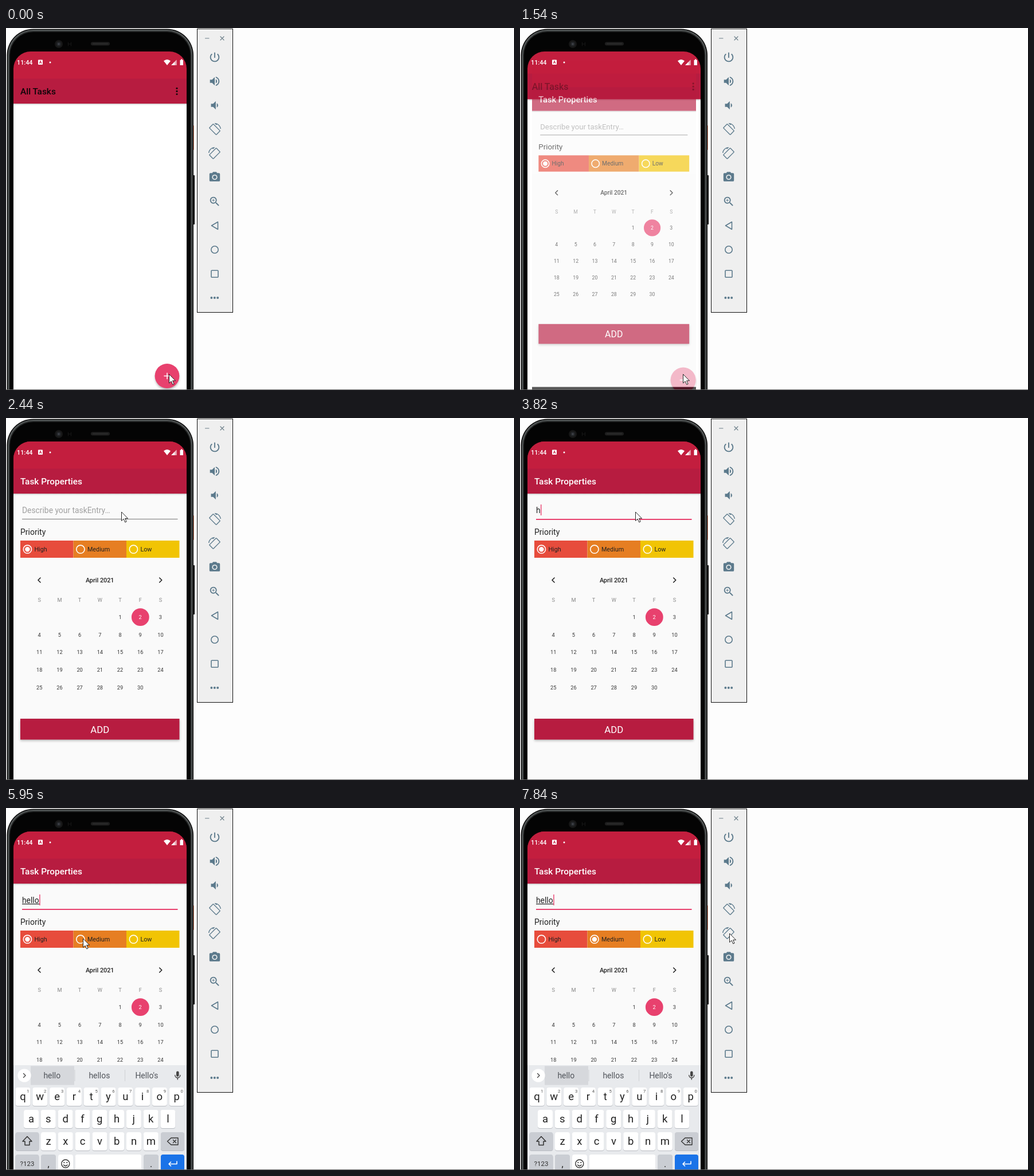
Write an HTML page that moves like this. It is 886 by 632 pixels and loops after 7990 ms.

```html
<!DOCTYPE html>
<html lang="en">
<head>
<meta charset="utf-8">
<title>Task app demo</title>
<style>
  html, body { margin: 0; width: 100%; height: 100%; overflow: hidden; background: #fdfdfd; }
  svg { display: block; width: 886px; height: 632px; font-family: Roboto, "Noto Sans", sans-serif; }
  .mid { text-anchor: middle; }
  .line { fill: none; stroke-linecap: round; stroke-linejoin: round; }
</style>
</head>
<body>
<svg id="stage" viewBox="0 0 886 632"></svg>
<script>
const PINK = '#e8416e', CRIMSON = '#b71c40', STATUS = '#c31e3e', SLATE = '#5c7a8c';
const LOOP = 7990;

const text = (x, y, size, s, fill = '#222', extra = '') =>
  `<text x="${x}" y="${y}" font-size="${size}" fill="${fill}" ${extra}>${s}</text>`;
const mid = (x, y, size, s, fill, extra = '') => text(x, y, size, s, fill, `class="mid" ${extra}`);
const rect = (x, y, w, h, fill, r = 0, extra = '') =>
  `<rect x="${x}" y="${y}" width="${w}" height="${h}" rx="${r}" fill="${fill}" ${extra}/>`;
const circle = (x, y, r, fill, extra = '') => `<circle cx="${x}" cy="${y}" r="${r}" fill="${fill}" ${extra}/>`;
const path = (d, fill, extra = '') => `<path d="${d}" fill="${fill}" ${extra}/>`;
const line = (d, color, w = 1.5) => `<path class="line" d="${d}" stroke="${color}" stroke-width="${w}"/>`;
const each = (list, fn) => [...list].map(fn).join('');

const defs = `<defs>
  <linearGradient id="drop" x1="0" x2="0" y1="0" y2="1">
    <stop offset="0" stop-opacity=".2"/><stop offset="1" stop-opacity="0"/>
  </linearGradient>
  <filter id="blur" x="-30%" y="-30%" width="160%" height="160%"><feGaussianBlur stdDeviation="2.2"/></filter>
  <clipPath id="screen">${rect(13, 41, 302, 700, '#000', 30)}</clipPath>
</defs>`;

// The phone body is a stack of rounded outlines, from the rim inwards.
function phone() {
  const shell = (inset, r, fill) => rect(1.5 + inset, 1.5 + inset, 325.5 - 2 * inset, 760, fill, r);
  return rect(325, 170, 3, 43, '#e08a70', 1) + rect(325, 257, 4.2, 86, '#1c1c1c', 1)
    + shell(0, 46, '#080808') + shell(1.6, 44.4, '#565a5a') + shell(3.6, 42.4, '#2a2c2c') + shell(5.4, 40.6, '#040404')
    + circle(92, 28, 7, '#171717') + circle(92, 28, 4, '#232528') + circle(92, 28, 1.8, '#40444a')
    + line('M108.5 25V31M113.5 25V31M108.5 28H113.5', '#161616', 1.2)
    + rect(148, 24.5, 33, 6, '#1e1e1e', 3) + rect(151, 26.5, 27, 2, '#2b2b2b', 1);
}

function statusBar() {
  return text(19, 64, 10.8, '11:44', '#fff', 'font-weight="500"')
    + rect(56, 55.5, 8, 8.5, '#fff', 1) + mid(60, 62.3, 7, 'A', STATUS, 'font-weight="700"')
    + circle(77, 60, 1.5, '#fff')
    + path('M275 57.5Q281 52.5 287 57.5L281 65Z', '#fff')
    + path('M288 65H297.5V55.5Z', '#fff') + path('M294 58.5L297.5 55V65H294Z', STATUS, 'opacity=".35"')
    + path('M303.5 56H305V54.5H307.5V56H309V65H303.5Z', '#fff');
}

const appBar = body => rect(13, 100, 302, 602, body) + rect(13, 132, 302, 3, 'url(#drop)')
  + rect(13, 41, 302, 60, STATUS) + rect(13, 88.5, 302, 43.5, CRIMSON) + rect(13, 641, 302, 61, '#000');

function listPage() {
  return appBar('#fff') + text(25, 116.3, 15.4, 'All Tasks', '#0d0508', 'font-weight="500"')
    + each([105.3, 110.4, 115.5], y => circle(298, y, 1.6, '#1a060b'))
    + circle(281, 610.5, 20.5, '#000', 'id="shade" opacity=".35" filter="url(#blur)"')
    + circle(281, 607.5, 21.4, PINK) + circle(281, 607.5, 21.4, '#fff', 'id="ripple"')
    + line('M276 607.5H286M281 602.5V612.5', '#fff', 1.5);
}

function radio(x, label, color, id) {
  return rect(x, 214, 92.5, 30, color)
    + circle(x + 12.4, 229.2, 7.1, 'none', 'stroke="#fff" stroke-width="1.6"')
    + circle(x + 12.4, 229.2, 4.2, '#fff', `id="${id}"`)
    + text(x + 24.4, 233.2, 10.8, label);
}

function calendar() {
  const col = i => 58.2 + 35.2 * i;
  let out = line('M60 279L56 283L60 287M267.7 279L271.7 283L267.7 287', '#222', 1.6)
    + mid(163.7, 286.8, 10.8, 'April 2021', '#222', 'font-weight="500"')
    + each('SMTWTFS', (d, i) => mid(col(i), 321.2, 9.2, d, '#888'))
    + circle(234.3, 347.7, 15.4, PINK);
  for (let d = 1; d <= 30; d++) {
    const cell = d + 3;
    out += mid(col(cell % 7), 351 + 30.7 * Math.floor(cell / 7), 9.2, d, d === 2 ? '#fff' : '#333');
  }
  return out;
}

function taskPage() {
  return appBar('#fafafa') + text(25, 116.3, 15.4, 'Task Properties', '#fff', 'font-weight="500"')
    + text(28, 166.3, 13.85, 'Describe your taskEntry…', '#a0a0a0', 'id="hint"')
    + text(28, 166.3, 13.85, '', '#222', 'id="entry"')
    + rect(28, 167, 30.5, 1.2, '#222', 0, 'id="under"')
    + rect(28, 176, 271.5, 1, '#777', 0, 'id="rule"')
    + rect(0, 151, 1.4, 19, PINK, 0, 'id="caret"')
    + text(25, 203.6, 14, 'Priority')
    + radio(25, 'High', '#e74c3c', 'high') + radio(117.5, 'Medium', '#e67e22', 'medium')
    + radio(210, 'Low', '#f1c404', 'low')
    + calendar()
    + rect(25, 527, 277.5, 36.5, '#000', 1, 'opacity=".25" filter="url(#blur)"')
    + rect(25, 525, 277.5, 36.5, CRIMSON) + mid(163.7, 549.8, 16.8, 'ADD', '#fff');
}

function key(x, y, w, fill = '#fff') {
  return rect(x, y + 1, w, 32, '#b9bcc2', 4) + rect(x, y, w, 32, fill, 4);
}

function keyboard() {
  const GREY = '#cacdd3', INK = '#222';
  const row = (letters, x0, y) => each(letters, (c, i) => {
    const x = x0 + 29.8 * i;
    return key(x - 13, y, 26) + mid(x, y + 21.8, 18.5, c, INK);
  });
  const words = ['hello', 'hellos', "Hello's"];
  return rect(13, 449, 302, 183, '#e8eaed')
    + rect(43, 450.5, 76, 33, '#d6d8dc', 0, 'id="pick"')
    + circle(32, 467, 11.6, '#fff') + line('M30.5 463.5L34 467L30.5 470.5', '#444', 1.4)
    + `<g id="words">` + rect(119.5, 457, 1, 20, '#cfd1d5') + rect(207, 457, 1, 20, '#cfd1d5')
    + each(words, (w, i) => mid(80.3 + 82.6 * i, 472, 13.9, w, '#50545a')) + '</g>'
    + rect(297, 459.5, 4.6, 9.5, '#444', 2.3) + line('M294.8 466.5A4.5 4.5 0 0 0 303.8 466.5M299.3 471V474', '#444', 1.4)
    + row('qwertyuiop', 29.5, 488)
    + each('1234567890', (c, i) => mid(38.5 + 29.8 * i, 497, 7.8, c, '#555'))
    + row('asdfghjkl', 44, 527)
    + key(16.5, 566, 41, GREY) + row('zxcvbnm', 74, 566) + key(270, 566, 41, GREY)
    + line('M37 573.5L45 582H41V588.5H33V582H29Z', '#333', 1.5)
    + line('M288 576H300V588H288L281.5 582ZM291.5 579.5L296.5 584.5M296.5 579.5L291.5 584.5', '#333', 1.4)
    + key(16.5, 605, 41, GREY) + mid(37, 625, 11.5, '?123', '#333')
    + key(61, 605, 26, GREY) + mid(74, 627, 16, ',', INK)
    + key(91, 605, 26) + circle(103.8, 621, 7, 'none', 'stroke="#333" stroke-width="1.4"')
    + circle(101.3, 619, 1.1, '#333') + circle(106.3, 619, 1.1, '#333') + line('M100.5 623Q103.8 627 107.1 623', '#333', 1.3)
    + key(120.5, 605, 116) + key(240, 605, 26, GREY) + mid(253, 627, 16, '.', INK)
    + key(270, 605, 41, '#1a73e8') + line('M298 617V621.5H284M287.5 618L284 621.5L287.5 625', '#fff', 1.6);
}

function toolPanel() {
  const icon = (y, body, flip = 1) =>
    `<g transform="translate(364 ${y}) scale(${.92 * flip} .92) translate(-12 -12)" fill="${SLATE}">${body}</g>`;
  const glyph = d => `<path d="${d}"/>`;
  const turn = glyph('M16.48 2.52c3.27 1.55 5.61 4.72 5.97 8.48h1.5C23.44 4.84 18.29 0 12 0l-.66.03 3.81 3.81 1.33-1.32z'
    + 'm-6.25-.77c-.59-.59-1.54-.59-2.12 0L1.75 8.11c-.59.59-.59 1.54 0 2.12l12.02 12.02c.59.59 1.54.59 2.12 0l6.36-6.36'
    + 'c.59-.59.59-1.54 0-2.12L10.23 1.75zm4.6 19.44L2.81 9.17l6.36-6.36 12.02 12.02-6.36 6.36z');
  return rect(333.5, 1.5, 62, 495, '#efefef', 0, 'stroke="#111"')
    + line('M347.5 18H354M374 15L380 21M380 15L374 21', '#6a7d88', 1.2)
    + icon(51, glyph('M13 3h-2v10h2V3zm4.83 2.17l-1.42 1.42A6.92 6.92 0 0 1 19 12a7 7 0 1 1-11.42-5.41L6.17 5.17A9 9 0 1 0 21 12c0-2.74-1.23-5.18-3.17-6.83z'))
    + icon(93, glyph('M3 9v6h4l5 5V4L7 9H3zm13.5 3A4.5 4.5 0 0 0 14 7.97v8.05c1.48-.73 2.5-2.25 2.5-4.02zM14 3.23v2.06c2.89.86 5 3.54 5 6.71s-2.11 5.85-5 6.71v2.06c4.01-.91 7-4.49 7-8.77s-2.99-7.86-7-8.77z'))
    + icon(135, glyph('M18.5 12A4.5 4.5 0 0 0 16 7.97v8.05c1.48-.73 2.5-2.25 2.5-4.02zM5 9v6h4l5 5V4L9 9H5z'))
    + icon(177, turn) + icon(219, turn, -1)
    + icon(260.5, glyph('M9 2L7.17 4H4a2 2 0 0 0-2 2v12a2 2 0 0 0 2 2h16a2 2 0 0 0 2-2V6a2 2 0 0 0-2-2h-3.17L15 2H9z')
      + circle(12, 12, 5, '#efefef') + circle(12, 12, 3.2, SLATE))
    + icon(303, glyph('M15.5 14h-.79l-.28-.27A6.5 6.5 0 1 0 9.5 16c1.61 0 3.09-.59 4.23-1.57l.27.28v.79l5 4.99L20.49 19l-4.99-5zm-6 0a4.5 4.5 0 1 1 0-9 4.5 4.5 0 0 1 0 9z')
      + glyph('M12 10h-2v2H9v-2H7V9h2V7h1v2h2v1z'))
    + line('M369.5 338.5L358.5 345L369.5 351.5Z', SLATE, 1.6)
    + circle(364, 387, 6.2, 'none', `stroke="${SLATE}" stroke-width="1.6"`)
    + rect(358, 423.2, 12, 12, 'none', 1, `stroke="${SLATE}" stroke-width="1.6"`)
    + each([358.4, 363.8, 369.2], x => circle(x, 471, 2, SLATE));
}

const stage = document.getElementById('stage');
stage.innerHTML = defs + phone()
  + `<g clip-path="url(#screen)"><g id="list">${listPage()}</g><g id="task">${taskPage()}</g>`
  + `<g id="keys">${keyboard()}</g>${statusBar()}</g>`
  + toolPanel() + rect(0, 631, 886, 1, '#666')
  + path('M0 0V15.5L3.6 12.2L6.2 18L8.6 17L6.1 11.3H11Z', '#fff', 'id="mouse" stroke="#111" stroke-width=".9"');
const $ = {};
stage.querySelectorAll('[id]').forEach(el => $[el.id] = el);

// Each track lists [start time, values...]; a value holds until the next entry.
const tracks = {
  mouse: [[0, 284.5, 604.5], [1900, 241, 549], [2050, 159, 192], [2200, 178, 186], [2320, 195, 171], [2440, 201.5, 164],
    [5260, 210, 222], [5410, 195, 232], [5530, 170.5, 237], [5680, 152, 234], [5830, 141, 231], [5950, 134.5, 228],
    [6760, 160, 240], [6880, 218, 258], [7000, 261, 254], [7150, 339, 156], [7300, 348, 166],
    [7450, 355, 189], [7570, 359, 200], [7720, 363, 213], [7840, 365.5, 219]],
  ripple: [[0, 0], [280, .1], [400, .2], [550, 0]],
  open: [[0, 1, 1, 0], [1540, 1.031, .947, .65], [1660, 1.044, .985, 1], [1780, 1.05, .997, 1], [1900, 1.05, 1, 1]],
  caret: [[0, 0], [2830, 1], [3230, 0], [3820, 1], [5260, 0], [5830, 1], [6250, 0], [6760, 1], [7300, 0], [7840, 1]],
  typed: [[0, 0], [3820, 1], [4500, 5]],
  slide: [[0, 190], [4100, 120], [4220, 35], [4340, 0]],
  dots: [[0, 4.2, 0], [6370, 2.6, 1.5], [6490, 0, 3], [6640, 0, 4.2]]
};

const at = (name, t) => tracks[name].filter(e => e[0] <= t).pop().slice(1);
const set = (el, attrs) => { for (const k in attrs) el.setAttribute(k, attrs[k]); };
const zoom = (cy, s) => `translate(164 ${cy}) scale(${s}) translate(-164 ${-cy})`;

function draw(t) {
  const [grow, scale, alpha] = at('open', t);
  set($.list, { transform: zoom(377, grow) });
  set($.task, { transform: zoom(371, scale), opacity: alpha });

  const [glow] = at('ripple', t);
  set($.ripple, { opacity: glow });
  set($.shade, { opacity: .35 + glow });

  const [count] = at('typed', t);
  const focused = t >= 2710;
  $.entry.textContent = 'hello'.slice(0, count);
  set($.hint, { opacity: count ? 0 : 1 });
  set($.under, { opacity: t >= 4640 ? 1 : 0 });
  set($.rule, { fill: focused ? PINK : '#777', height: focused ? 2 : 1 });
  set($.caret, { x: count === 5 ? 58.2 : count ? 36 : 28.2, opacity: at('caret', t)[0] });

  const [high, medium] = at('dots', t);
  set($.high, { r: high });
  set($.medium, { r: medium });
  set($.low, { r: 0 });

  set($.keys, { transform: `translate(0 ${at('slide', t)[0]})` });
  set($.words, { opacity: t >= 4640 ? 1 : 0 });
  set($.pick, { opacity: t >= 4760 ? 1 : 0 });
  set($.mouse, { transform: `translate(${at('mouse', t).join(' ')})` });
}

function tick() {
  draw(performance.now() % LOOP);
  requestAnimationFrame(tick);
}
tick();
</script>
</body>
</html>
```
